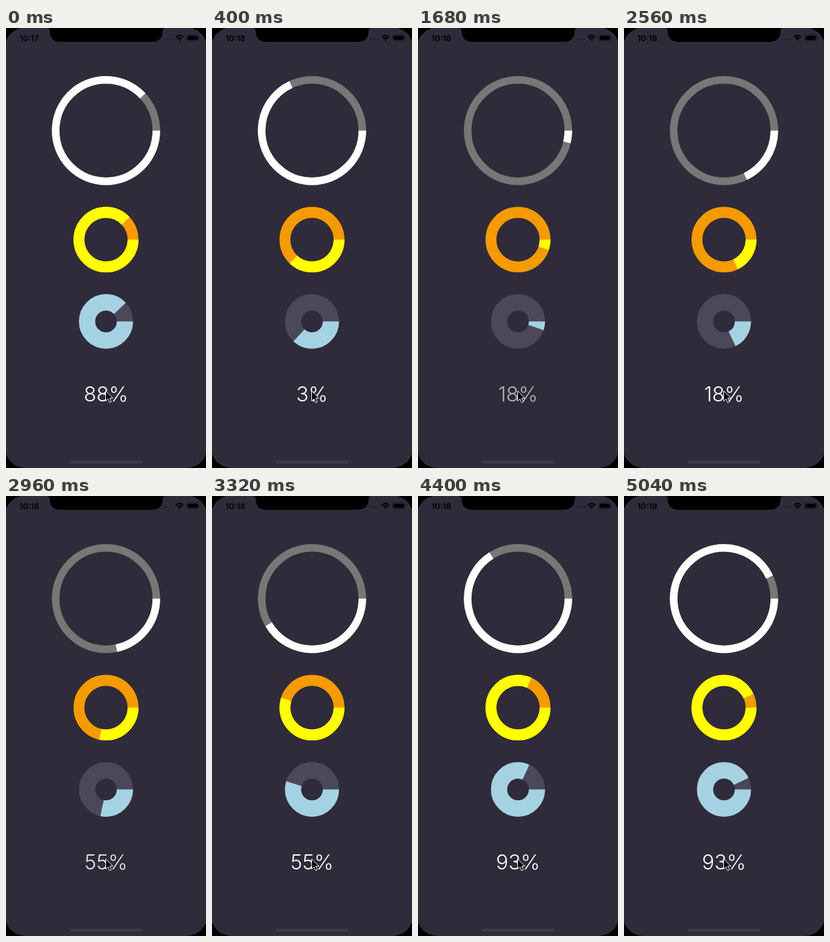
Write an HTML page that moves like this. It is 306 px wide and 668 px high and loops after 5.08 s.

```html
<!DOCTYPE html>
<html lang="en">
<head>
<meta charset="utf-8">
<title>Progress rings</title>
<style>
  html, body { margin: 0; width: 100%; height: 100%; overflow: hidden; background: #000; }
  svg { display: block; width: 306px; height: 668px; }
  text { font-family: Inter, Roboto, sans-serif; }
  #clock { font-size: 12.4px; font-weight: 600; }
  #label { font-size: 31.5px; font-weight: 300; fill: #fff; text-anchor: middle; }
</style>
</head>
<body>
<svg id="stage" viewBox="0 0 306 668" xmlns="http://www.w3.org/2000/svg">
  <rect width="306" height="668"/>
  <rect x="-2" y="-1" width="310" height="669" rx="32" fill="#2f2b3a"/>
  <path d="M62 0Q67 0 67 5Q67 21 84 21H222Q239.500 21 239.500 5Q239.500 0 244 0Z"/>

  <text id="clock" x="20.500" y="19.500"></text>
  <g fill="#16141c">
    <circle cx="242.500" cy="17" r=".9"/><circle cx="246.500" cy="17" r=".9"/>
    <circle cx="250.500" cy="17" r=".9"/><circle cx="254.500" cy="17" r=".9"/>
  </g>
  <g fill="none" stroke="#000" stroke-width="2">
    <path d="M259.700 14Q265.500 8.600 271.300 14"/>
    <path d="M262 16.500Q265.500 13.300 269 16.500"/>
  </g>
  <path d="M263.600 17.800Q265.500 16.400 267.400 17.800L265.500 19.800Z"/>
  <rect x="276.500" y="10.500" width="18.500" height="9" rx="2.600" fill="none" stroke="#17151d"/>
  <rect x="278" y="12" width="15.500" height="6" rx="1.400"/>
  <path d="M296.300 13.500q1.500 1.500 0 3z" fill="#17151d"/>

  <g id="rings" fill="none"></g>
  <text id="label" x="153" y="567"></text>
  <path d="M152.500 551v15.300l3.500-3.300 2.500 5.700 2.700-1.200-2.500-5.500h4.800z" stroke="#fff" stroke-width="1"/>
  <rect x="97.500" y="657" width="111.500" height="4.200" rx="2.100" fill="#3d3a44"/>
</svg>
<script>
const LOOP = 5080, STEP = 40, CLOCK_TICK = 240, FADE = 250, FIRST = 88;
const changes = [
  { at: 65, to: 3 },
  { at: 1522, to: 18 },
  { at: 2740, to: 55 },
  { at: 4025, to: 93 }
];
const rings = [
  { y: 155.7, outer: 82.8, width: 11.6, track: '#777', color: '#fff', duration: 1000 },
  { y: 321.3, outer: 49.7, width: 16.6, track: '#f59b00', color: '#ff0', duration: 600 },
  { y: 445.5, outer: 41.4, width: 24.8, track: '#4b485a', color: '#a5d2e3', duration: 600 }
];

const byId = id => document.getElementById(id);
const clamp = x => Math.min(1, Math.max(0, x));

function addCircle(ring, color) {
  const circle = document.createElementNS('http://www.w3.org/2000/svg', 'circle');
  const attrs = { cx: 153, cy: ring.y, r: ring.outer - ring.width / 2,
    stroke: color, 'stroke-width': ring.width, pathLength: 100 };
  for (const name in attrs) circle.setAttribute(name, attrs[name]);
  return byId('rings').appendChild(circle);
}

for (const ring of rings) {
  addCircle(ring, ring.track);
  ring.arc = addCircle(ring, ring.color);
}

// Ease-in-out, cubic-bezier(.42, 0, .58, 1)
function ease(x) {
  let low = 0, high = 1;
  for (let i = 0; i < 24; i++) {
    const s = (low + high) / 2, r = 1 - s;
    if (3 * r * r * s * 0.42 + 3 * r * s * s * 0.58 + s ** 3 < x) low = s;
    else high = s;
  }
  return low * low * (3 - 2 * low);
}

function render(t) {
  let from = FIRST, to = FIRST, start = -LOOP;
  for (const change of changes) {
    if (t >= change.at) [from, to, start] = [to, change.to, change.at];
  }
  for (const ring of rings) {
    const p = clamp((t - start) / ring.duration);
    const value = from + (to - from) * (p < 1 ? ease(p) : 1);
    ring.arc.setAttribute('stroke-dasharray', `${value} 200`);
  }
  byId('label').textContent = to + '%';
  byId('label').setAttribute('opacity', clamp((t - start) / FADE));
  byId('clock').textContent = t < CLOCK_TICK ? '10:17' : '10:18';
}

const origin = performance.now();
function tick() {
  const t = (performance.now() - origin) % LOOP;
  render(Math.floor(t / STEP) * STEP);
  requestAnimationFrame(tick);
}
tick();
</script>
</body>
</html>
```
